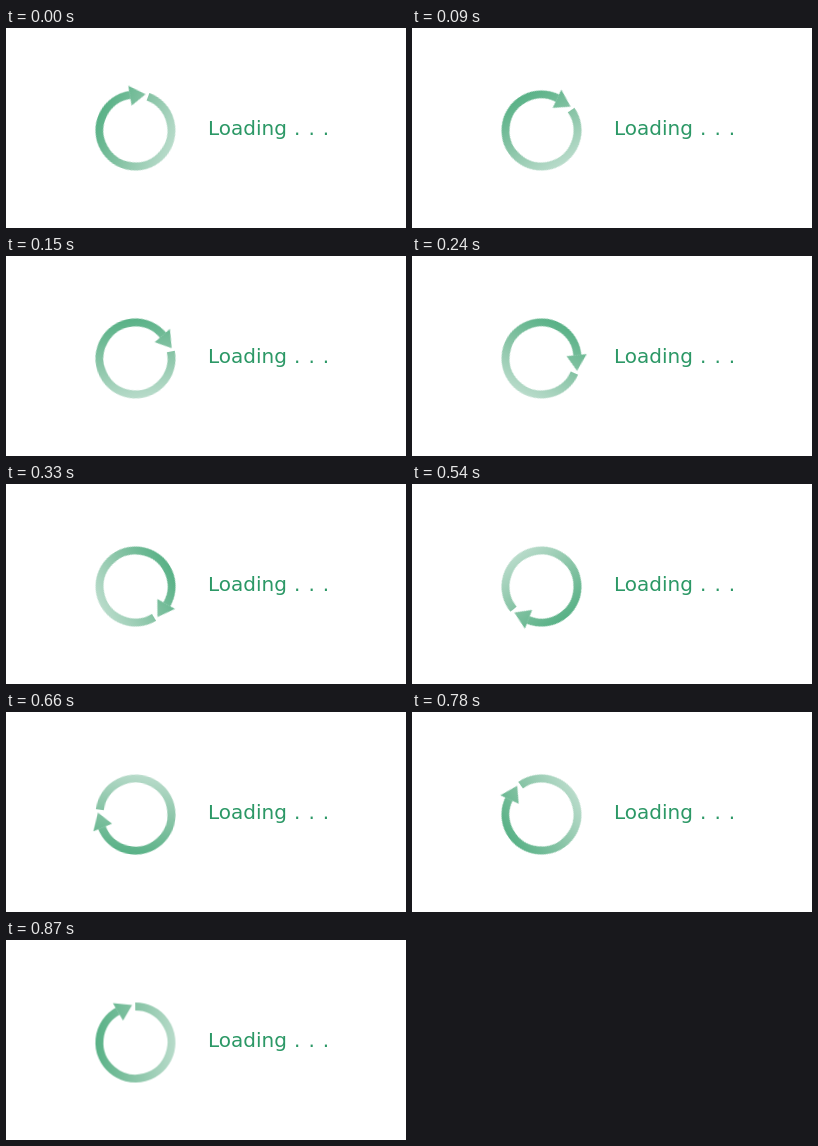
An HTML page that plays this animation: 400x200 px, repeating every 900 ms.

```html
<!DOCTYPE html>
<html lang="en">
<head>
<meta charset="utf-8">
<title>Loading</title>
<style>
  html, body { margin: 0; width: 100%; height: 100%; overflow: hidden; background: #fff; }
  svg { display: block; width: 400px; height: 200px; }
  text { font: 20px "DejaVu Sans", sans-serif; fill: #2c9866; }
  .dots { word-spacing: 1.7px; }
  /* 30 held poses, 11.7deg apart, then a longer jump back to the start */
  .spinner { animation: turn 900ms steps(30, end) infinite; }
  @keyframes turn {
    from { transform: rotate(20.3deg); }
    to { transform: rotate(371.3deg); }
  }
</style>
</head>
<body>
<svg viewBox="0 0 400 200">
  <defs>
    <linearGradient id="fade" gradientUnits="userSpaceOnUse" x1="-40" y1="-2" x2="40" y2="2">
      <stop offset="0" stop-color="#58b186"/>
      <stop offset=".5" stop-color="#88c4a6"/>
      <stop offset="1" stop-color="#b8dbca"/>
    </linearGradient>
  </defs>
  <g transform="translate(129.5 102.5)">
    <g class="spinner">
      <path d="M0-36A36 36 0 1 1-17.5-31.5" fill="none" stroke="url(#fade)" stroke-width="8"/>
      <path d="M-22.3-39.6L-3.1-37.4L-12.3-22.1Z" fill="url(#fade)"/>
    </g>
  </g>
  <text x="202" y="107">Loading</text>
  <text class="dots" x="288" y="107">. . .</text>
</svg>
</body>
</html>
```
